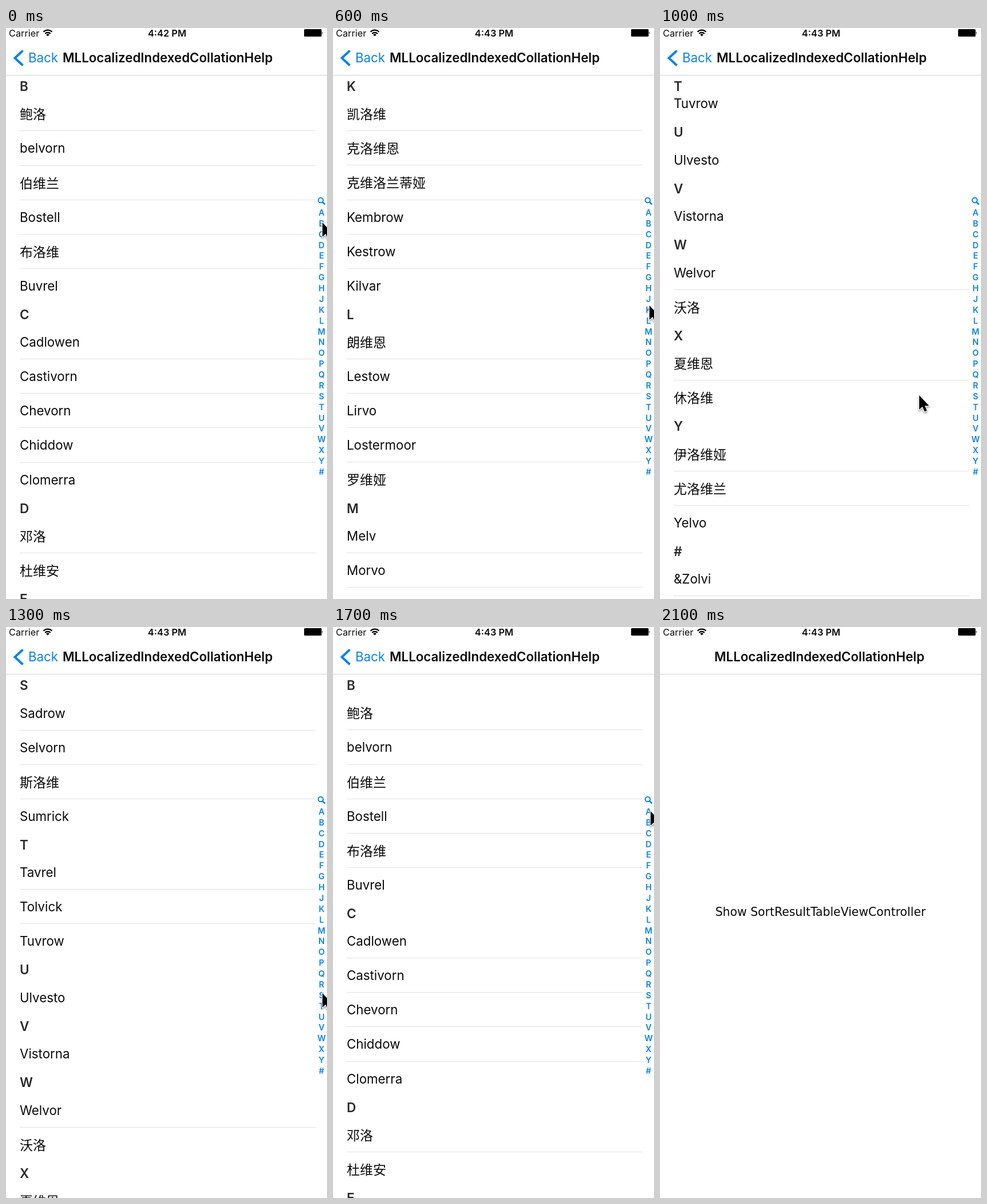
Recreate the animation shown at these times as an HTML page. Size 561 by 998 pixels, loop 2400 ms.

```html
<!DOCTYPE html>
<html lang="en">
<head>
<meta charset="utf-8">
<title>Indexed list</title>
<style>
  html, body { margin: 0; width: 100%; height: 100%; overflow: hidden; background: #fff; }
  #stage {
    --blue: #0a82ee;
    position: absolute; left: 0; top: 0; width: 561px; height: 998px;
    overflow: hidden; background: #fff; color: #0a0a0a;
    font: 22.3px/30px Inter, Roboto, sans-serif;
    white-space: nowrap;
  }
  #stage div, #stage svg { position: absolute; box-sizing: border-box; }

  #root, #page { left: 0; top: 0; width: 561px; height: 998px; background: #fff; }
  #page { box-shadow: -3px 0 10px #0002; }
  #label {
    left: 0; right: 0; top: 483px; text-align: center;
    font: 20.4px/30px "DejaVu Sans", sans-serif;
  }

  #list { left: 0; top: 82px; width: 541px; height: 916px; overflow: hidden; }
  #stage #list section, #stage #list .row, #stage #list h2 { position: relative; }
  #search { position: relative !important; height: 60.1px; background: #cbcbd0; }
  #field { left: 7px; top: 11px; width: 524px; height: 38px; border-radius: 6px; background: #fff; }
  #hint { left: 253px; top: 15px; font-size: 18.6px; color: #9a9a9e; }
  #stage #list h2 {
    position: sticky; top: 0; z-index: 1; margin: 0; height: 38.3px;
    padding-left: 24px; box-sizing: border-box; background: #fff; color: #2a2a2a;
    font-size: 22.5px; font-weight: 600; line-height: 40px;
  }
  .row { height: 60.1px; margin-left: 24px; line-height: 60px; border-bottom: 1px solid #e1e1e3; }
  .row:last-child { border-color: transparent; }
  section:last-child .row { border-color: #e1e1e3; }
  section:last-child { padding-bottom: 4.7px; }
  .han { font-family: "Noto Sans CJK SC", "Noto Sans CJK", sans-serif; font-size: 23px; line-height: 58px; }

  #index div {
    left: 541px; width: 21px; text-align: center; color: var(--blue);
    font-size: 14.4px; font-weight: 600; line-height: 20px;
  }

  #bar { left: 0; top: 0; width: 561px; height: 83px; background: #fff; border-bottom: 1px solid #d2d2d4; }
  #carrier { left: 5px; top: -1px; font-size: 16.3px; line-height: 20px; }
  #clock { left: 0; width: 563px; top: -1px; text-align: center; font-size: 16.4px; font-weight: 600; line-height: 20px; }
  #back { left: 39px; top: 37px; color: var(--blue); }
  #title { top: 37px; font-size: 22.3px; font-weight: 600; }
  #art, #cursor { left: 0; top: 0; overflow: visible; }
  #cursor { filter: drop-shadow(0 2px 1.5px #0006); }
</style>
</head>
<body>
<div id="stage">
  <div id="root"><div id="label">Show SortResultTableViewController</div></div>

  <div id="page">
    <div id="list">
      <div id="search">
        <div id="field"></div>
        <svg width="541" height="60" fill="none" stroke="#939398" stroke-width="1.6">
          <circle cx="231" cy="28" r="6.6"/><path d="M236 33l6 6"/>
        </svg>
        <div id="hint">Search</div>
      </div>
    </div>
    <div id="index">
      <svg width="561" height="320" fill="none" stroke="#0a82ee" stroke-width="2">
        <circle cx="550" cy="301" r="4.3"/><path d="M553 304l4.5 4.5" stroke-width="2.6"/>
      </svg>
    </div>
  </div>

  <div id="bar">
    <div id="carrier">Carrier</div>
    <div id="clock"></div>
    <svg id="art" width="561" height="82">
      <g fill="none" stroke="#000" stroke-width="2.3">
        <path d="M65.5 6.6a10.8 10.8 0 0 1 15 0M68.3 9.8a6.8 6.8 0 0 1 9.4 0"/>
      </g>
      <path d="M70.2 11.7a4 4 0 0 1 5.6 0L73 14.6z"/>
      <rect x="521" y="2" width="30.5" height="13" rx="1.5"/>
      <path d="M552.5 6.2q2.2 2.3 0 4.6z"/>
      <path id="chevron" d="M29.5 39.5L15.5 52.5L29.5 65.5" fill="none" stroke="#0a82ee" stroke-width="4"/>
    </svg>
    <div id="back">Back</div>
    <div id="title">MLLocalizedIndexedCollationHelp</div>
  </div>

  <svg id="cursor" width="20" height="32">
    <path d="M0 0V25L5.6 19.8L9.4 28.6L13.6 26.8L9.8 18.2H17.2Z"
      stroke="#fff" stroke-width="2.4" stroke-linejoin="round" paint-order="stroke"/>
  </svg>
</div>

<script>
const names = {
  A: "阿维洛娅 Adrun Abrolan Almie 安蒂洛娅 奥兰维丁 奥维兰",
  B: "鲍洛 belvorn 伯维兰 Bostell 布洛维 Buvrel",
  C: "Cadlowen Castivorn Chevorn Chiddow Clomerra",
  D: "邓洛 杜维安",
  E: "Edvorn 埃洛维 Elmorick",
  F: "Felm 弗洛维恩",
  G: "Gostel",
  H: "哈维洛 Hestow 怀洛维 霍维恩",
  J: "Jorv 加洛维恩 杰维洛 Jolwen",
  K: "凯洛维 克洛维恩 克维洛兰蒂娅 Kembrow Kestrow Kilvar",
  L: "朗维恩 Lestow Lirvo Lostermoor 罗维娅",
  M: "Melv Morvo Mustrel 穆洛维",
  N: "Nirvo Nostel Nuvelorn",
  O: "Odrell Olvorn Olvorn Ostelmo 欧洛",
  P: "Pavro Pestow Pilvo Pomry Pustel",
  Q: "Quorvel",
  R: "Restow Rolvane",
  S: "Sadrow Selvorn 斯洛维 Sumrick",
  T: "Tavrel Tolvick Tuvrow",
  U: "Ulvesto",
  V: "Vistorna",
  W: "Welvor 沃洛",
  X: "夏维恩 休洛维",
  Y: "伊洛维娅 尤洛维兰 Yelvo",
  "#": "&Zolvi"
};

// One entry per 100 ms: section at the top, pointer x, pointer y.
const steps = [
  ["B", 553, 340], ["C", 553, 370], ["D", 553, 404], ["F", 553, 436],
  ["H", 553, 453], ["J", 553, 468], ["K", 553, 485], ["O", 553, 560],
  ["T", 553, 660], ["#", 540, 700], ["#", 453, 642], ["#", 453, 642],
  ["#", 500, 680], ["S", 553, 640], ["Q", 556, 520], ["N", 560, 358],
  ["G", 556, 345], ["B", 555, 322], ["top", 552, 300], ["top", 38, 52],
  ["top", 38, 52], ["top", 38, 52]
];

const ROW = 60.1, HEAD = 38.3, LOOP = 2400;
const $ = id => document.getElementById(id);

function add(parent, tag, text, className = "") {
  const el = document.createElement(tag);
  el.textContent = text;
  el.className = className;
  parent.append(el);
  return el;
}

const offsets = { top: 0 };
let y = ROW;
Object.entries(names).forEach(([letter, line], i) => {
  const section = add($("list"), "section", "");
  const rows = line.split(" ");
  add(section, "h2", letter);
  for (const name of rows)
    add(section, "div", name, /[\u4e00-\u9fff]/.test(name) ? "row han" : "row");
  offsets[letter] = y;
  y += HEAD + rows.length * ROW;
  add($("index"), "div", letter).style.top = 313 + i * 18.87 + "px";
});

let shown = -1;
function show(n) {
  const [section, x, top] = steps[n];
  const last = steps.length - 1;
  const pop = n === last ? 1 : n === last - 1 ? 0.5 : 0;
  $("list").scrollTop = offsets[section];
  $("clock").textContent = n < 5 ? "4:42 PM" : "4:43 PM";
  $("page").style.transform = `translateX(${561 * pop}px)`;
  $("page").style.visibility = pop === 1 ? "hidden" : "visible";
  $("root").style.transform = `translateX(${-168 * (1 - pop)}px)`;
  $("title").style.left = 99 - 4 * pop + "px";
  $("back").style.opacity = $("chevron").style.opacity = 1 - pop;
  $("cursor").style.transform = `translate(${x}px, ${top}px)`;
  $("cursor").style.visibility = pop === 1 ? "hidden" : "visible";
}

const start = performance.now();
function tick() {
  const t = (performance.now() - start) % LOOP;
  const n = Math.min(steps.length - 1, Math.floor(t / 100));
  if (n !== shown) show(shown = n);
  requestAnimationFrame(tick);
}
tick();
</script>
</body>
</html>
```
